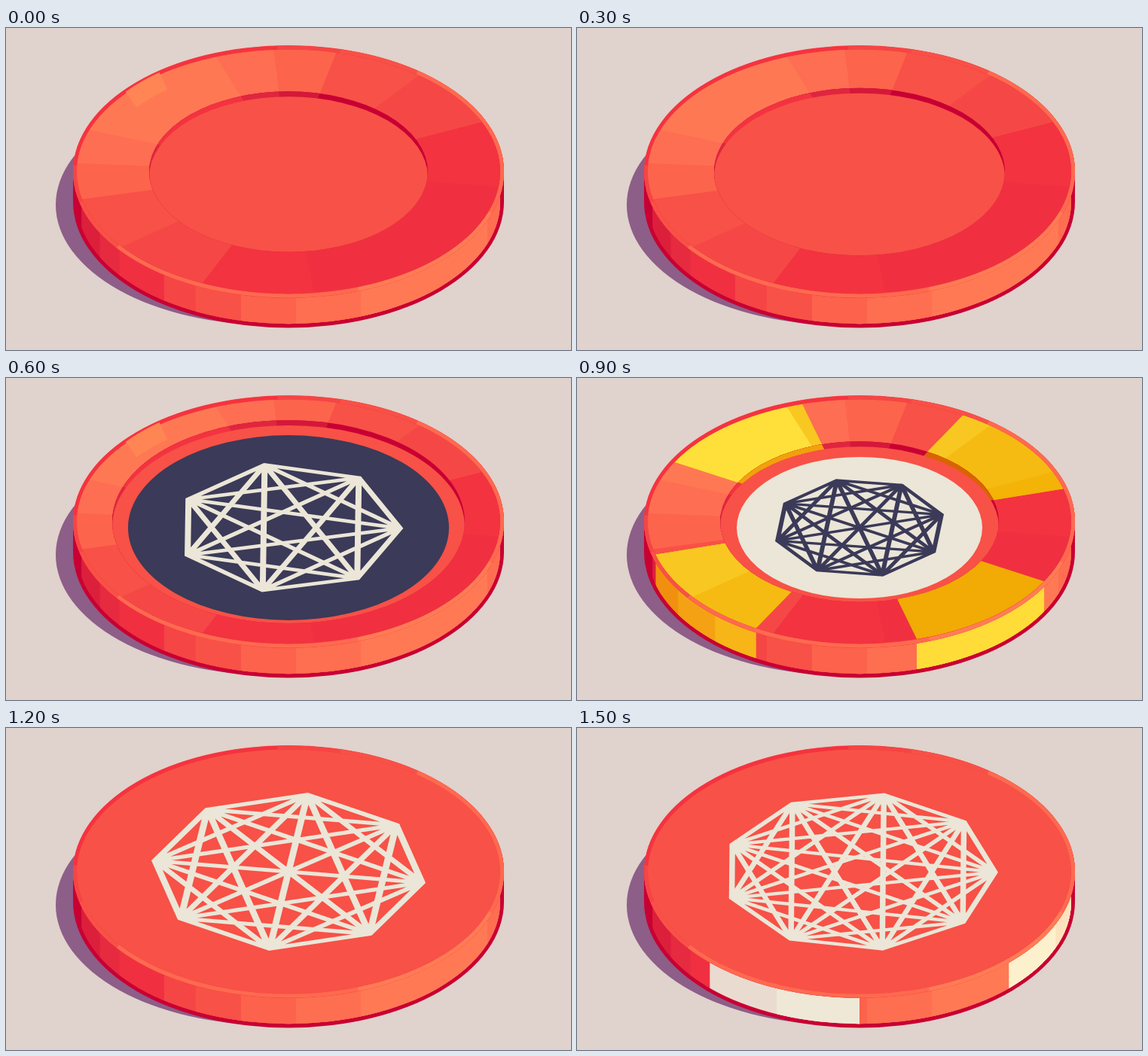
Recreate the animation shown at these times as an HTML page with a canvas. Size 750x428 px, loop 1800 ms.

```html
<!DOCTYPE html>
<html lang="en">
<head>
<meta charset="utf-8">
<title>Coins</title>
<style>
  html, body { margin: 0; width: 100%; height: 100%; overflow: hidden; background: #e0d2cc; }
  canvas { display: block; }
</style>
</head>
<body>
<canvas id="stage" width="750" height="428"></canvas>
<script>
const g = document.getElementById('stage').getContext('2d');
const CX = 375, TOP = 191, LOW = 231, R = 281, TILT = 0.577, STEP = 300;
const LIT = 225, SHADED = 45;   // facing directions on the coin, clockwise degrees
const BASE = '#f85147', CRIMSON = '#c80033', CREAM = '#ebe6d7', NAVY = '#3b3a58';
const rad = deg => deg * Math.PI / 180;

// Tones: each colour covers this many degrees either side of its direction
const FACE = { 180: '#f03040', 142: '#f33340', 111: '#f54846', 83: BASE, 58: '#fc644c', 41: '#fe6e52', 25: '#ff7854' };
const GOLD = { 180: '#f1ab04', 142: '#f3b307', 111: '#f5bb12', 83: '#f8c722', 25: '#ffe03a' };
const WALL = { 180: CRIMSON, 58: '#d5183a', 41: '#e0263f', 25: '#f33340' };
const GOLD_WALL = { 180: '#d86400', 41: '#f0a20a' };
const RIM = { 180: '#f53340', 138: '#f54545', 121: BASE, 98: '#fe6a50', 26: '#ff7c55' };
const SIDE = { 180: CRIMSON, 123: '#dc203c', 108: '#e62a40', 98: '#f03040', 81: '#f54545', 71: BASE, 58: '#fc624c', 43: '#fe6e50', 25: '#ff7955' };
const GOLD_SIDE = { 180: '#f1900f', 104: '#f4a213', 88: '#f7b518', 58: '#ffdc38' };
const CREAM_SIDE = { 180: '#eadbd1', 68: '#efe8d6', 45: '#fce3be', 23: '#fdf0cd' };

function shade(tones, facing, draw) {
  const spans = Object.keys(tones).map(Number).sort((a, b) => b - a);
  for (const span of spans) {
    g.fillStyle = g.strokeStyle = tones[span];
    draw(facing - span, facing + span);
  }
}

function clipped(trace, draw) {
  g.save();
  g.beginPath();
  trace();
  g.clip();
  draw();
  g.restore();
}

const trace = (cy, rx, ry = rx * TILT, cx = CX) => g.ellipse(cx, cy, rx, ry, 0, 0, 2 * Math.PI);

function oval(color, ...size) {
  g.beginPath();
  trace(...size);
  g.fillStyle = color;
  g.fill();
}

function arc(r, from, to, width) {
  g.beginPath();
  g.ellipse(CX, TOP, r, r * TILT + (r > R ? 1.5 : 0), 0, rad(from), rad(to));
  g.lineWidth = width;
  g.stroke();
}

function traceSector(from, to) {
  g.moveTo(CX, TOP);
  g.ellipse(CX, TOP, R, R * TILT, 0, rad(from), rad(to));
  g.closePath();
}

function sector(from, to) {
  g.beginPath();
  traceSector(from, to);
  g.fill();
}

// The strip of the coin's side between two directions
function traceBand(from, to) {
  const left = to >= 180 ? 0 : CX + R * Math.cos(rad(to));
  const right = from <= 0 ? 750 : CX + R * Math.cos(rad(from));
  g.rect(left, 0, right - left, 428);
}

function band(from, to) {
  g.beginPath();
  traceBand(from, to);
  g.fill();
}

// Every second eighth of the circle
function eighths(start, traceOne) {
  for (let a = start; a < start + 360; a += 90) traceOne(a, a + 45);
}

function body(patch, start) {
  oval('#8d5e88', 235, 286, 160, 352);
  oval(CRIMSON, LOW, 286, 167.5);
  g.fillRect(89, TOP, 572, LOW - TOP);
  clipped(() => { trace(LOW, R); g.rect(CX - R, TOP, 2 * R, LOW - TOP); }, () => {
    shade(SIDE, SHADED, band);
    if (patch) clipped(() => {
      traceBand(start, start + 45);
      traceBand(start + 90, start + 135);
    }, () => shade(patch, SHADED, band));
  });
  oval(BASE, TOP, 286, 168);
  shade(RIM, SHADED, (from, to) => arc(283.5, from, to, 5));
}

function turned(tones, goldTones, start) {
  shade(tones, LIT, sector);
  if (goldTones) clipped(() => eighths(start, traceSector), () => shade(goldTones, LIT, sector));
}

function ring(hole, { glint, gold } = {}) {
  turned(FACE, gold && GOLD, gold);
  if (glint) {
    g.strokeStyle = '#ff8555';
    arc(267, LIT - 6.5, LIT + 6.5, 25);
  }
  clipped(() => trace(TOP, hole), () => {
    turned(WALL, gold && GOLD_WALL, gold);
    oval(BASE, TOP + 7, hole);
  });
}

// Every corner of a regular polygon joined to every other
function web(n, r, turn, cy, width, color) {
  const at = k => [r * Math.cos(turn + rad(k * 360 / n)), r * Math.sin(turn + rad(k * 360 / n))];
  g.save();
  g.translate(CX, cy);
  g.scale(1, TILT);
  g.beginPath();
  for (let i = 0; i < n; i++) g.lineTo(...at(i));
  g.closePath();
  for (let i = 0; i < n; i++)
    for (let j = 0; j < i - 1; j++) {
      g.moveTo(...at(i));
      g.lineTo(...at(j));
    }
  g.lineWidth = width;
  g.strokeStyle = color;
  g.stroke();
  g.restore();
}

const scenes = [
  () => {
    body();
    ring(185, { glint: true });
  },
  () => {
    body();
    ring(193);
  },
  () => {
    body();
    ring(234, { glint: true });
    oval(NAVY, 199, 213);
    web(7, 148, 0.009, 199, 8, CREAM);
  },
  () => {
    body(GOLD_SIDE, 29.3);
    ring(185, { gold: 29.3 });
    oval(CREAM, 199, 163);
    web(8, 113, -0.27, 199, 6, NAVY);
  },
  () => {
    body();
    web(8, 179, 0.141, TOP, 9, CREAM);
  },
  () => {
    body(CREAM_SIDE, 0);
    web(9, 180, 0.006, TOP, 7.5, CREAM);
  }
];

const start = performance.now();
function draw() {
  const t = performance.now() - start;
  g.fillStyle = '#e0d2cc';
  g.fillRect(0, 0, 750, 428);
  scenes[Math.floor(t / STEP) % scenes.length]();
  requestAnimationFrame(draw);
}
draw();
</script>
</body>
</html>
```
